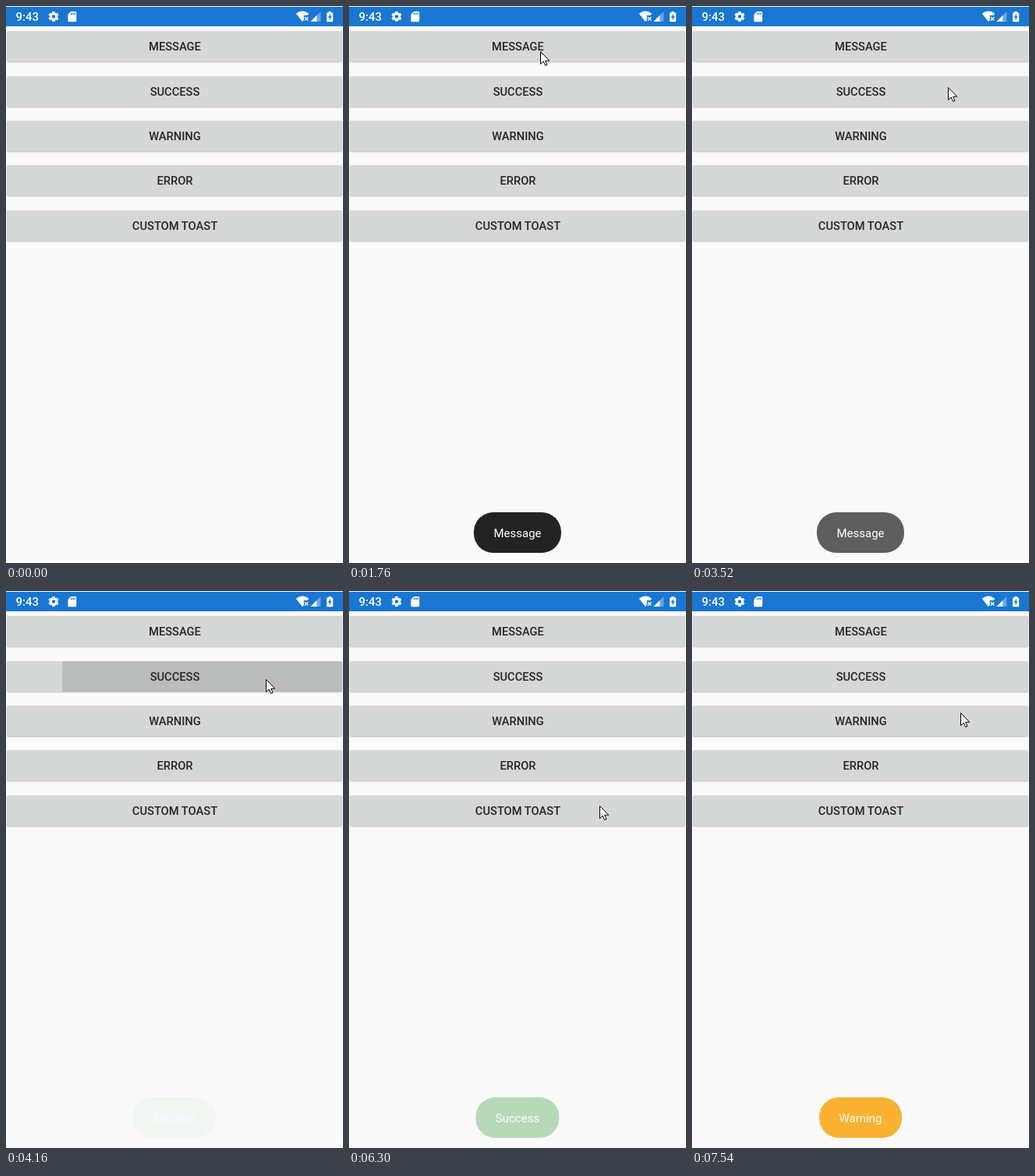
An HTML page for the animation above (8 s loop, 432 px wide and 714 px high).

```html
<!DOCTYPE html>
<html lang="en">
<head>
<meta charset="utf-8">
<title>Toast demo</title>
<style>
  html, body { margin: 0; width: 432px; height: 714px; overflow: hidden; background: #fafafa; }
  body { position: relative; font-family: Roboto, "Open Sans", sans-serif; }
  svg { position: absolute; left: 0; top: 0; }
  .button {
    position: absolute; left: 1px; width: 430px; height: 39px; border-radius: 2px;
    background: #d6d7d7; box-shadow: 0 1px 2px rgba(0, 0, 0, .25);
    color: #262626; font: 500 14.7px/40px Roboto, sans-serif; text-align: center; text-indent: 1px;
  }
  .ripple { position: absolute; inset: 0; border-radius: 2px; background: rgba(0, 0, 0, .126); opacity: 0; }
  .label { position: relative; }
  .toast {
    position: absolute; left: 216px; top: 648.6px; height: 52.4px; padding: 0 25.5px;
    transform: translateX(-50%); border-radius: 25px; opacity: 0;
    color: #fff; font-size: 15px; line-height: 55px; white-space: nowrap;
  }
  #cursor { z-index: 2; }
</style>
</head>
<body>
<svg width="432" height="27">
  <rect y="1" width="432" height="25" fill="#1976d2"/>
  <text x="12.5" y="19" fill="#fff" font-family="Roboto, sans-serif" font-size="15" font-weight="500">9:43</text>
  <g transform="translate(61 13.5)" stroke="#fff" fill="none">
    <path d="M0-6.6V6.6M-5.7-3.3 5.7 3.3M-5.7 3.3 5.7-3.3" stroke-width="3.4"/>
    <circle r="3.7" fill="#1976d2" stroke-width="2.9"/>
  </g>
  <path d="M83.2 7H89a1.2 1.2 0 0 1 1.2 1.2V19A1.2 1.2 0 0 1 89 20.2H80.6A1.2 1.2 0 0 1 79.4 19V10.8z" fill="#fff"/>
  <path d="M83.7 8.6v2.6M86 8.6v2.6M88.3 8.6v2.6" stroke="#1976d2" stroke-width="1.2"/>
  <path d="M371.8 9.8Q380 3.2 388.2 9.8L386.4 12H381.8V18L380 20.2z" fill="#fff"/>
  <path d="M383 14.2l4.4 4.4m0-4.4l-4.4 4.4" stroke="#fff" stroke-width="1.4"/>
  <path d="M403.4 7V20H390.4z" fill="#fff" opacity=".35"/>
  <path d="M398.4 12V20H390.4z" fill="#fff"/>
  <path d="M413.4 7h3.4v1.4h1.5a.9.9 0 0 1 .9.9v10a.9.9 0 0 1-.9.9h-6.4a.9.9 0 0 1-.9-.9v-10a.9.9 0 0 1 .9-.9h1.5z" fill="#fff"/>
  <path d="M415.8 9.8l-3 5h1.8v3.6l3-5.2h-1.8z" fill="#1976d2"/>
</svg>
<svg id="cursor" width="14" height="21">
  <path d="M.5.5V16.5L4.2 13 6.6 18.4 9 17.4 6.7 12.1H11.8z" fill="#fff" stroke="#000"/>
</svg>
<script>
const LOOP = 8000;
const STEP = 76.9;
const LAG = 18;          // phase of the recording
const FADE_IN = 330, FADE_OUT = 310, STAY = 1700;

const presses = [
  { button: 0, x: 244, y: 26, text: "Message", color: "#222", start: 1290, shown: 1750, speed: 2 },
  { button: 1, x: 332, y: 24, text: "Success", color: "#80bf80", start: 3910, shown: 4463, speed: .83 },
  { button: 2, x: 343, y: 10, text: "Warning", color: "#fbb132", start: 6913, shown: 7530, speed: 2.1 }
];

// Pointer strokes: start, end, destination
const origin = [297, 601];
const strokes = [
  [70, 830, 244, 65], [920, 1070, 233, 46], [1070, 1140, 245, 58],
  [2210, 2680, 213, 691], [2760, 3290, 331, 74], [3290, 3537, 328, 104], [3537, 3750, 333, 113],
  [4530, 5080, 180, 697], [5140, 5383, 155, 643], [5383, 5680, 249, 660], [5680, 5990, 215, 680],
  [6000, 6530, 388, 21], [6530, 6840, 344, 156]
];

const ramp = (t, start, length) => Math.min(1, Math.max(0, (t - start) / length));
const smooth = k => k * k * (3 - 2 * k);

function add(parent, className, text = "") {
  const el = document.createElement("div");
  el.className = className;
  el.textContent = text;
  return parent.appendChild(el);
}

const ripples = ["MESSAGE", "SUCCESS", "WARNING", "ERROR", "CUSTOM TOAST"].map((name, i) => {
  const button = add(document.body, "button");
  button.style.top = Math.round(32.2 + i * 57.4) + "px";
  const ripple = add(button, "ripple");
  add(button, "label", name);
  return ripple;
});
for (const p of presses) {
  p.toast = add(document.body, "toast", p.text);
  p.toast.style.background = p.color;
}
const cursor = document.getElementById("cursor");

function moveCursor(t) {
  let [x, y] = origin;
  for (const [start, end, toX, toY] of strokes) {
    const k = smooth(ramp(t, start, end - start));
    x += (toX - x) * k;
    y += (toY - y) * k;
  }
  cursor.style.visibility = t < strokes[0][0] ? "hidden" : "visible";
  cursor.style.transform = `translate(${Math.round(x)}px, ${Math.round(y)}px)`;
}

function drawPress(p, t) {
  const ripple = ripples[p.button];
  const radius = Math.max(0, 60 + p.speed * (t - p.start));
  ripple.style.opacity = t < p.start ? 0 : 1 - ramp(t, p.shown - 230, 230);
  ripple.style.clipPath = `circle(${radius}px at ${p.x}px ${p.y}px)`;
  p.toast.style.opacity = ramp(t, p.shown - FADE_IN, FADE_IN) - ramp(t, p.shown + STAY, FADE_OUT);
}

function draw(time) {
  const t = Math.floor((time + LAG) / STEP) * STEP;
  moveCursor(t);
  for (const p of presses) drawPress(p, t);
}

const began = performance.now();
function loop() {
  draw((performance.now() - began) % LOOP);
  requestAnimationFrame(loop);
}
loop();
</script>
</body>
</html>
```
